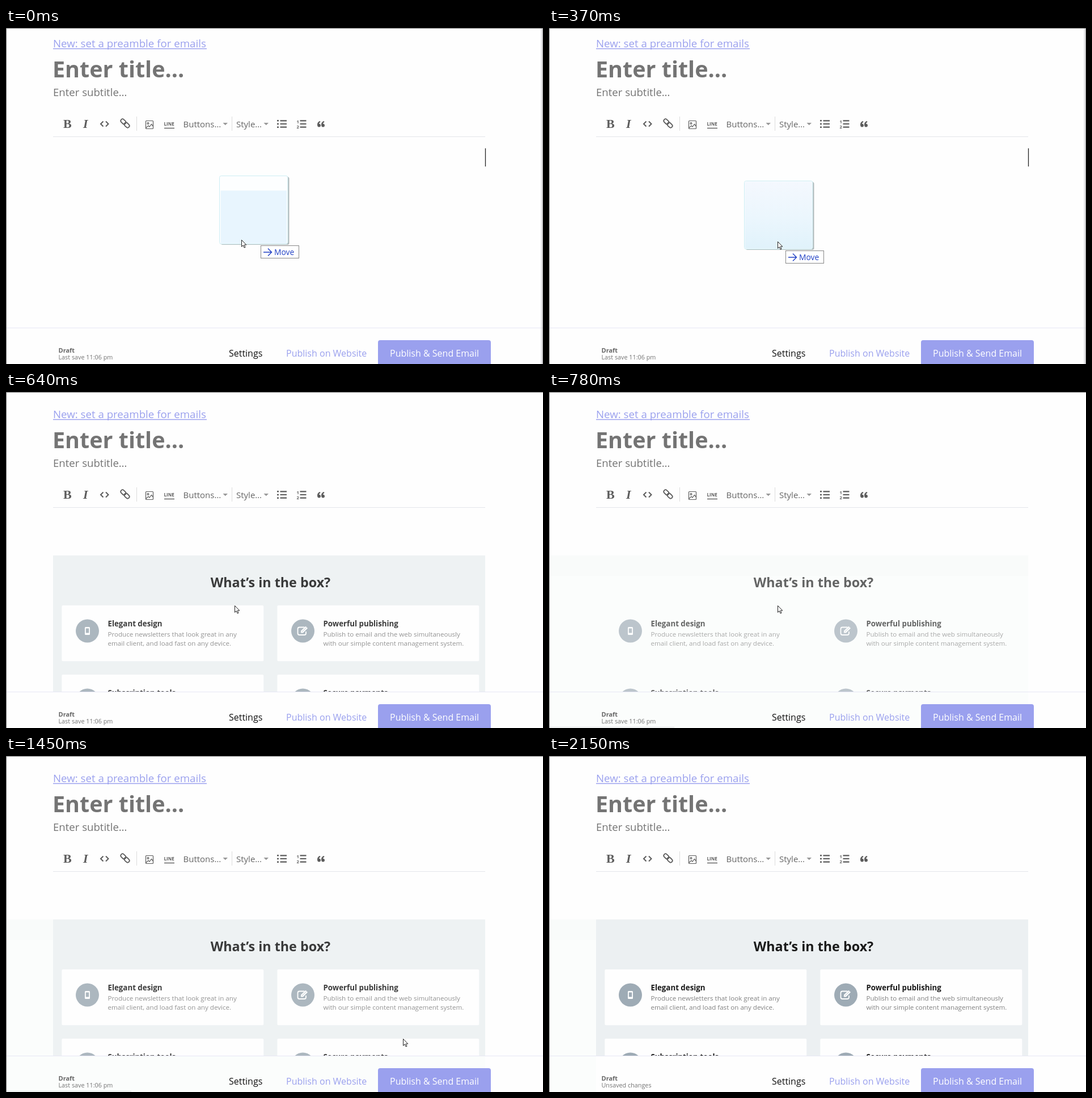
Write an HTML page that moves like this. It is 947 by 592 pixels and loops after 2.55 s.

```html
<!DOCTYPE html>
<html lang="en">
<head>
<meta charset="utf-8">
<title>Newsletter editor</title>
<style>
  html, body { margin: 0; width: 100%; height: 100%; overflow: hidden; background: #fefefe; }
  svg { display: block; width: 947px; height: 592px; font-family: "Open Sans", sans-serif; }
  .bold { font-weight: 700; }
  .line { fill: none; stroke: #5c5c5c; stroke-width: 1.2; }
  .white { fill: none; stroke: #fff; stroke-width: 1.8; }
  #toolbar { fill: #5c5c5c; }
  #toolbar .serif { font: 700 22px "Liberation Serif", serif; }
  #toolbar .italic { font-style: italic; }
</style>
</head>
<body>
<svg viewBox="0 0 947 592">
  <g id="page">
    <text x="83" y="34" font-size="18.7" fill="#9aa0ee">New: set a preamble for emails</text>
    <path d="M83 36.5H354" stroke="#9aa0ee" stroke-width="1.3"/>
    <text class="bold" x="82" y="87" font-size="39.5" fill="#747474">Enter title…</text>
    <text x="83" y="120" font-size="18.6" fill="#747474">Enter subtitle…</text>
    <g id="toolbar">
      <text class="serif" x="101" y="176">B</text>
      <text class="serif italic" x="136" y="176">I</text>
      <path class="line" style="stroke-width:2" d="M171.500 164.500l-4.500 4.500l4.500 4.500M176 164.500l4.500 4.500l-4.500 4.500"/>
      <g class="line" style="stroke-width:1.8" transform="rotate(45 210 168)">
        <rect x="200.500" y="164.800" width="10.200" height="6.400" rx="3.200"/>
        <rect x="209.300" y="164.800" width="10.200" height="6.400" rx="3.200"/>
      </g>
      <g class="line">
        <rect x="246.500" y="163.500" width="13" height="14" rx="1"/>
        <circle cx="250.500" cy="168" r="1.400"/>
        <path d="M247 176l4-4l2 2l3.500-4.500l3 3.500"/>
      </g>
      <text class="bold" x="278.500" y="172" font-size="8">LINE</text>
      <path d="M279 175.800h18v1.400h-18z"/>
      <g font-size="15" fill="#666">
        <text x="312.500" y="175">Buttons…</text>
        <text x="406" y="175">Style…</text>
      </g>
      <path fill="#999" d="M382.500 167h8.500l-4.250 4.300zM454.500 167h8.500l-4.250 4.300z"/>
      <path d="M230.500 156v25M398.500 156v25" stroke="#dcdcdc"/>
      <path d="M478 162h3v2.600h-3zm0 5.700h3v2.600h-3zm0 5.700h3v2.600h-3zM483.500 162.200H495v2.200h-11.500zm0 5.700H495v2.200h-11.500zm0 5.700H495v2.200h-11.500zM518.500 162.200H529.500v2.200h-11zm0 5.700H529.500v2.200h-11zm0 5.700H529.500v2.200h-11z"/>
      <text class="bold" x="512.500" y="168" font-size="7.500">1</text>
      <text class="bold" x="512.500" y="176.500" font-size="7.500">2</text>
      <path id="quote" d="M554 164c-3 .5-5 3-5 6.500c0 2.500 1 4 3 4s3-1.200 3-3s-1.200-3-3-2.800c.2-1.400 1-2.200 2.300-2.600z"/>
      <use href="#quote" x="7"/>
    </g>
    <path d="M83 191.500H845" stroke="#e3e5ea"/>
  </g>

  <g id="drag">
    <path d="M845.500 212v32" stroke="#222" stroke-width="1.3"/>
    <g id="tile">
      <rect x="379" y="262.500" width="120.500" height="119.500" rx="3" fill="#b9bfc0"/>
      <rect x="378" y="262" width="120.500" height="119" rx="3" fill="#a9b3b5"/>
      <rect x="376.500" y="260.500" width="120.500" height="120" rx="3" fill="#fdfeff" stroke="#cdeef4"/>
      <rect id="flat" x="378.500" y="286.500" width="116.500" height="93" fill="#e8f5fe"/>
      <rect id="shaded" x="377.500" y="261.500" width="118.500" height="118" rx="2" fill="url(#sky)"/>
      <rect x="449.500" y="383.500" width="67" height="22" fill="#fff" stroke="#888"/>
      <path d="M454 395h14.500m-6.500-6.500l6.500 6.500l-6.500 6.500" fill="none" stroke="#1f3fc4" stroke-width="1.400"/>
      <text x="473" y="400" font-size="13.800" fill="#1f3fc4">Move</text>
    </g>
  </g>

  <g id="block">
    <g id="tint">
      <rect x="1" y="288" width="100%" height="36" fill="#f9fbfa"/>
      <rect x="1" y="324" width="100%" height="205" fill="#fbfdfc"/>
    </g>
    <rect id="under" x="83" y="288" width="762" height="241" fill="#fefefe"/>
    <g id="panel">
      <rect x="83" y="288" width="762" height="241" fill="#ecf0f2"/>
      <g id="cards" fill="#fefefe"></g>
    </g>
    <g id="content">
      <text class="bold" x="466.500" y="344" font-size="23.300" fill="#1a1a1a" text-anchor="middle">What’s in the box?</text>
      <g id="features"></g>
      <g transform="translate(143.500 421)">
        <rect x="-4.500" y="-7" width="9" height="14" rx="1.500" fill="#fff"/>
        <path d="M-2.700-4.500h5.400v8h-5.400z" fill="#9eabb5"/>
      </g>
      <g transform="translate(523.500 421)">
        <path class="white" d="M3-6.500h-9q-3 0-3 3v7.500q0 3 3 3h8.500q3 0 3-3v-3"/>
        <path fill="#fff" d="M-3.500 3.500v-3.800l8.500-8l3.500 3.500l-8.300 8.300z"/>
        <path d="M-2 1.800l8-7.600" stroke="#9eabb5" stroke-width=".8"/>
      </g>
    </g>
  </g>

  <rect x="1" y="529" width="946" height="63" fill="#fefefe"/>
  <rect id="footTint" x="1" y="529" height="63" fill="#fbfdfc"/>
  <path d="M1 528.500H947" stroke="#e7e7f5"/>
  <path id="status" d="M1 590.500H221" stroke="#e2e4e4"/>
  <text class="bold" x="92.500" y="572" font-size="11" fill="#666">Draft</text>
  <text id="saved" x="92.500" y="584" font-size="10.800" fill="#737373"></text>
  <g font-size="16">
    <text x="393" y="579" fill="#111">Settings</text>
    <text x="494" y="579" fill="#9aa0ee">Publish on Website</text>
    <rect x="656" y="550" width="199" height="50" rx="4" fill="#9aa0ee"/>
    <text x="677" y="579" fill="#fff">Publish &amp; Send Email</text>
  </g>
  <g id="scrollbar">
    <path d="M943.500 1V592" stroke="#e2e2e6"/>
    <path d="M946 1V592" stroke="#77777b"/>
  </g>
  <path id="cursor" d="M.5.500V12.300l2.700-2.500l1.900 4.300l1.900-.8l-1.900-4.200h3.700z" fill="#fff" stroke="#222"/>
  <path d="M0 .5H947M.5 0V592" stroke="#707070"/>
  <defs>
    <linearGradient id="sky" x2="0" y2="1">
      <stop stop-color="#f4f8fe"/><stop offset=".55" stop-color="#ebf6fd"/><stop offset="1" stop-color="#e0f2fb"/>
    </linearGradient>
  </defs>
</svg>
<script>
const LOOP = 2550;
const $ = id => document.getElementById(id);
const show = (id, on) => $(id).setAttribute('display', on ? 'inline' : 'none');

const features = [
  ['Elegant design', 'Produce newsletters that look great in any', 'email client, and load fast on any device.'],
  ['Powerful publishing', 'Publish to email and the web simultaneously', 'with our simple content management system.'],
  ['Subscription tools'],
  ['Secure payments']
];
features.forEach(([title, ...lines], i) => {
  const x = i % 2 * 380, y = (i >> 1) * 122;
  $('cards').innerHTML += `<rect x="${98.3 + x}" y="${376 + y}" width="356" height="98.300" rx="2"/>`;
  $('features').innerHTML +=
    `<circle cx="${143.5 + x}" cy="${421 + y}" r="20.500" fill="#9eabb5"/>
     <text class="bold" x="${179.5 + x}" y="${412.5 + y}" font-size="13.300" fill="#1a1a1a">${title}</text>` +
    lines.map((line, n) =>
      `<text x="${179.5 + x}" y="${431 + n * 15.7}" font-size="11.600" fill="#808080">${line}</text>`).join('');
});

// Each entry holds from its start time until the next one.
const fade = [[0, 1], [640, .85], [780, .67], [900, .57], [1050, .5], [1180, .52], [1320, .67], [1450, .85], [1600, 1]];
const pointer = [[0, [415, 373]], [120, [403, 376]], [1450, [700, 498]], [1600, [858, 551]],
  [1730, [913, 583]], [1870, [913, 586]], [2000, [960, 600]]];
const at = (steps, t) => steps.findLast(([start]) => t >= start)[1];

function draw(t) {
  const dropped = t >= 510, shaded = t >= 370;
  const tinted = t >= 780, washed = tinted && t < 1050;
  $('page').setAttribute('transform', `translate(0 ${dropped ? 12 : 0})`);

  show('drag', !dropped);
  show('scrollbar', !dropped);
  $('tile').setAttribute('transform', t < 120 ? '' : 'translate(-32 9)');
  show('flat', !shaded);
  show('shaded', shaded);

  show('block', dropped);
  show('tint', tinted);
  for (const rect of $('tint').children) rect.setAttribute('width', washed ? 844 : 82);
  show('under', !washed);
  show('panel', !washed);
  for (const id of ['panel', 'content']) $(id).setAttribute('opacity', at(fade, t));

  show('footTint', tinted);
  $('footTint').setAttribute('width', t < 1600 ? 844 : 82);
  show('status', tinted && t < 2150);
  $('saved').textContent = t < 1600 ? 'Last save 11:06 pm' : 'Unsaved changes';
  $('cursor').setAttribute('transform', `translate(${at(pointer, t)})`);
}

function tick() {
  draw(performance.now() % LOOP);
  requestAnimationFrame(tick);
}
tick();
</script>
</body>
</html>
```
